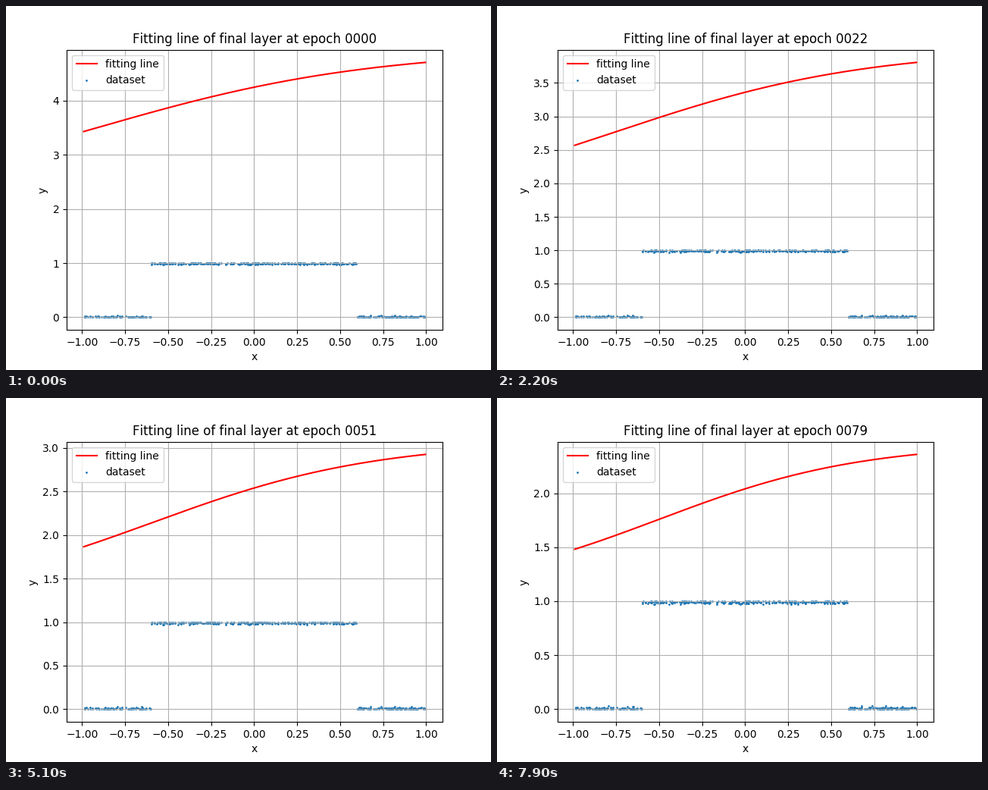
Recreate the animation shown at these times as a matplotlib script. Size 640x480 px, loop 8000 ms.

```python
import numpy as np
import matplotlib.pyplot as plt
from matplotlib.animation import FuncAnimation

FRAMES, INTERVAL = 80, 100
X_MIN, X_MAX = -0.9905, 0.9961

plt.rcParams["text.kerning_factor"] = 6


def curve(epoch):
    """A stretch of tanh that sinks, steepens and shifts as training goes on."""
    s = epoch / 100
    left = 3.432 - 4.727 * s + 3.952 * s**2 - 1.385 * s**3
    right = 4.709 - 4.600 * s + 2.355 * s**2 - 0.376 * s**3
    u = epoch / (FRAMES - 1)
    steepness = 0.62 + 0.23 * u
    center = -0.93 + 0.43 * u * (1.6 - 0.6 * u)
    rise = np.tanh(steepness * (x - center))
    rise = (rise - rise[0]) / (rise[-1] - rise[0])
    return left + (right - left) * rise


def make_dataset(n=500):
    """A noisy box function, with the noise kept inside 0..1."""
    rng = np.random.default_rng(4)
    px = rng.uniform(X_MIN, X_MAX, n)
    box = (np.abs(px) < 0.6).astype(float)
    noise = np.minimum(np.abs(rng.normal(0, 0.011, n)), 0.03)
    return px, np.abs(box - noise)


x = np.linspace(X_MIN, X_MAX, 300)
fig, ax = plt.subplots(figsize=(6.4, 4.8), dpi=100)
line, = ax.plot(x, curve(0), color="red", label="fitting line")
ax.scatter(*make_dataset(), s=1, label="dataset")
pad = 0.05 * (X_MAX - X_MIN)
ax.set_xlim(X_MIN - pad, X_MAX + pad)
ax.set_xlabel("x")
ax.set_ylabel("y")
ax.grid(True)
ax.legend(loc="upper left")
title = ax.set_title("")


def update(epoch):
    y = curve(epoch)
    top = y.max()
    line.set_ydata(y)
    ax.set_ylim(-0.05 * top, 1.05 * top)
    title.set_text(f"Fitting line of final layer at epoch {epoch:04d}")
    return line, title


anim = FuncAnimation(fig, update, frames=FRAMES, interval=INTERVAL, repeat=True)
plt.show()
```
